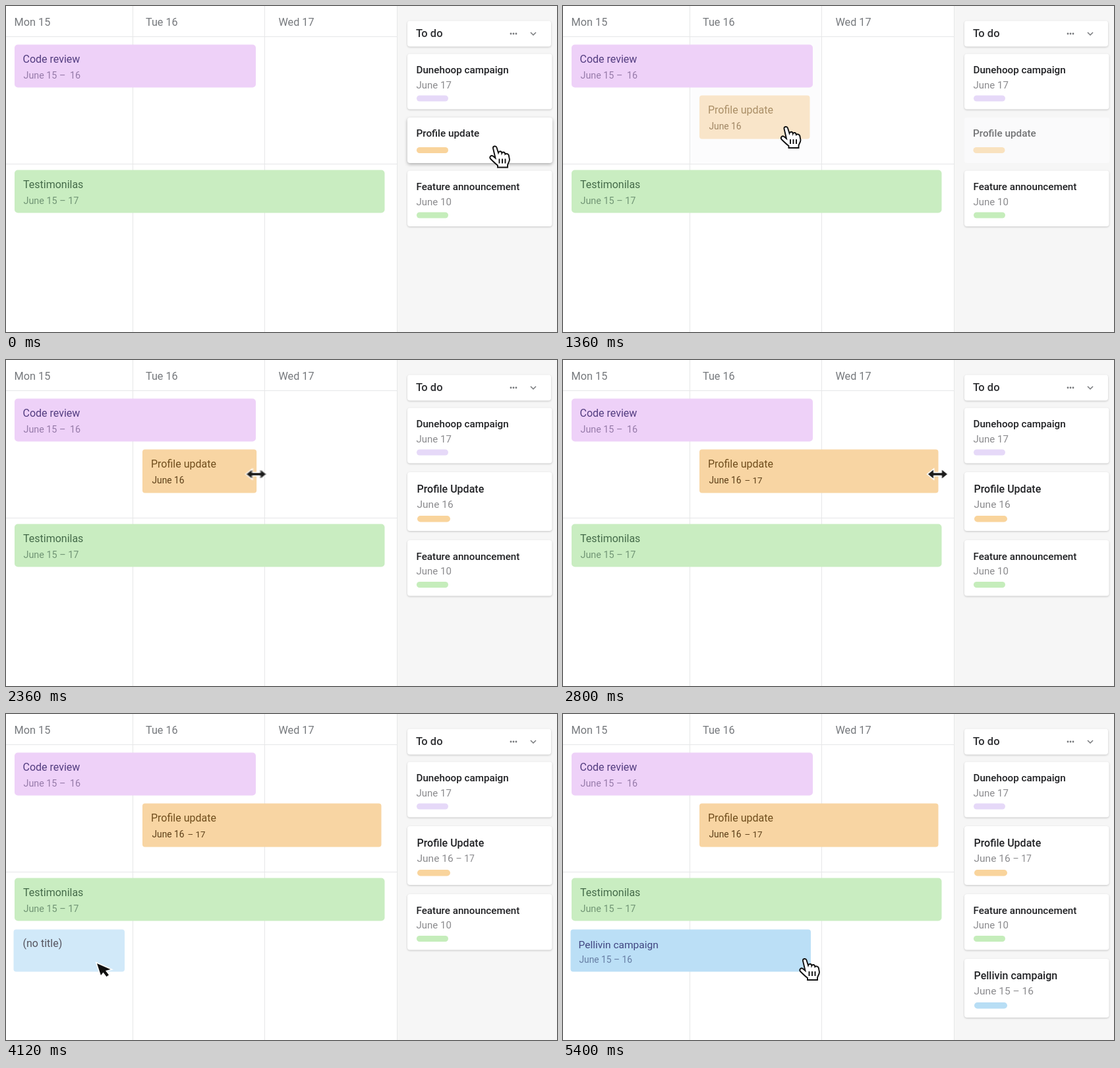
Write an HTML page with a canvas that moves like this. It is 836 by 494 pixels and loops after 6.52 s.

```html
<!DOCTYPE html>
<html lang="en">
<head>
<meta charset="utf-8">
<title>Calendar planning</title>
<style>
  html, body { margin: 0; width: 100%; height: 100%; overflow: hidden; background: #fff; }
  canvas { display: block; width: 836px; height: 494px; }
</style>
</head>
<body>
<canvas id="stage" width="836" height="494"></canvas>
<script>
const W = 836, H = 494, LOOP = 6520, STEP = 40;
const stage = document.getElementById('stage').getContext('2d');
const blurLayer = document.createElement('canvas');
blurLayer.width = W;
blurLayer.height = H;
const blurCtx = blurLayer.getContext('2d');

const PURPLE = '#eed1f8', GREEN = '#c9edc1', ORANGE = '#f8d5a3', BLUE = '#bbdff6';
const INK = '#202124', GRAY = '#8b8b8e';

const mix = (a, b, p) => a + (b - a) * p;
const span = (t, from, to) => Math.min(1, Math.max(0, (t - from) / (to - from)));
const smooth = u => u * u * (3 - 2 * u);
const lateSmooth = u => smooth(u * u);

function box(x, y, w, h, r, color) {
  stage.fillStyle = color;
  stage.beginPath();
  stage.roundRect(x, y, w, h, r);
  stage.fill();
}

function text(str, x, y, size, color, weight = 400) {
  stage.font = `${weight} ${size}px Roboto, sans-serif`;
  stage.fillStyle = color;
  stage.fillText(str, x, y);
}

function line(x1, y1, x2, y2) {
  stage.strokeStyle = '#e6e7e8';
  stage.lineWidth = 1;
  stage.beginPath();
  stage.moveTo(x1, y1);
  stage.lineTo(x2, y2);
  stage.stroke();
}

function faded(alpha, draw) {
  if (alpha <= 0) return;
  stage.save();
  stage.globalAlpha = alpha;
  draw();
  stage.restore();
}

function panel(x, y, w, h, lifted = false) {
  stage.save();
  stage.shadowColor = lifted ? 'rgba(0,0,0,.3)' : 'rgba(0,0,0,.2)';
  stage.shadowBlur = lifted ? 5 : 3;
  stage.shadowOffsetY = lifted ? 2 : 1;
  box(x, y, w, h, 4, '#fff');
  stage.restore();
}

function grid(t) {
  stage.fillStyle = '#fff';
  stage.fillRect(0, 0, W, H);
  if (t >= 1040 && t < 1440) {
    stage.fillStyle = '#fcfcfd';
    stage.fillRect(193, 47, 199, 191);
  }
  stage.fillStyle = '#f6f6f6';
  stage.fillRect(594, 0, W - 594, H);
  line(0, 46.5, 594, 46.5);
  line(0, 239.5, 594, 239.5);
  for (const x of [192.5, 392.5, 593.5]) line(x, 0, x, H);
  text('Mon 15', 12.5, 29.5, 16.3, '#76797d');
  text('Tue 16', 212, 29.5, 16.2, '#76797d');
  text('Wed 17', 413.5, 29.5, 16.2, '#76797d');
}

function fixedEvents() {
  box(13, 58.5, 366, 65, 5, PURPLE);
  text('Code review', 25.5, 86, 16, '#533d80');
  text('June 15 –', 26.5, 110, 14.3, '#967ba9');
  text('16', 97, 110, 14.3, '#967ba9');
  box(13, 248.5, 561.5, 65, 5, GREEN);
  text('Testimonilas', 26, 276, 16, '#456b4a');
  text('June 15 – 17', 26.5, 300, 14.4, '#719575');
}

function profileEvent(t) {
  faded(span(t, 1200, 1480), () => {
    const right = mix(374.5, 569.5, smooth(span(t, 2310, 2800)));
    box(207, 135.5, right - 207, 66, 4, ORANGE);
    text('Profile update', 220, 162.5, 16, '#704e1d');
    text('June 16', 221.5, 186.5, 13.8, '#5d3f18');
    if (t >= 2600) text('– 17', 275.5, 186.5, 13.3, '#5d3f18');
  });
}

function newEvent(t) {
  faded(span(t, 4040, 4160), () => {
    const right = mix(180, 376, smooth(span(t, 4400, 4960)));
    box(11.5, 326.5, right - 11.5, 64, 4, BLUE);
    const named = span(t, 5200, 5400);
    faded(1 - named, () => text('(no title)', 25.5, 352.5, 16, '#56545f'));
    faded(named, () => {
      text('Pellivin campaign', 23.5, 354.5, 15.5, '#404580');
      text('June 15 – 16', 24.5, 377, 13.8, '#667da3');
    });
  });
}

function profileCard(x, y, lifted) {
  panel(x, y, 220, 69, lifted);
  profileLabel(x, y, INK);
}

function profileLabel(x, y, color) {
  text('Profile update', x + 13.5, y + 29, 15.3, color, 500);
  box(x + 14, y + 45, 48, 9, 4.5, '#f9d49c');
}

function todoCard(y, h, title, date, pill, size = 15.2) {
  panel(609, y, 219.5, h);
  text(title, 622.5, y + 29.5, size, INK, 500);
  text(date, 622.5, y + 52, 15, GRAY);
  box(623, y + 63, 48, 9, 4.5, pill);
}

function wideCard(y, title, date, pill) {
  panel(609, y, 219.5, 89);
  text(title, 623.5, y + 30.5, 16, INK, 500);
  text(date, 623.5, y + 54, 15.5, GRAY);
  box(624, y + 66, 50, 9.5, 4.7, pill);
}

function sidebar(t) {
  panel(609, 22.5, 218, 39);
  text('To do', 622, 46.5, 16.5, '#303134', 500);
  stage.fillStyle = '#77797c';
  for (const x of [766, 770, 774]) {
    stage.beginPath();
    stage.arc(x, 42, 1.4, 0, 7);
    stage.fill();
  }
  stage.strokeStyle = '#77797c';
  stage.lineWidth = 1.5;
  stage.beginPath();
  stage.moveTo(796, 40);
  stage.lineTo(800, 44);
  stage.lineTo(804, 40);
  stage.stroke();

  todoCard(72.5, 84, 'Dunehoop campaign', 'June 17', '#e6d9f8');
  const scheduled = t >= 1400;
  todoCard(scheduled ? 273 : 249.5, 84.5, 'Feature announcement', 'June 10', '#c5edbb');
  if (scheduled) {
    wideCard(170, 'Profile Update', 'June 16', '#f9d49c');
    faded(span(t, 3080, 3200), () => text('– 17', 682.5, 224, 14, GRAY));
  } else if (t < 480) {
    profileCard(609, 169, true);
  } else {
    box(609, 169, 220, 69, 4, '#fafafb');
    faded(span(t, 1160, 1480), () => profileLabel(608.5, 169, INK));
  }
  faded(span(t, 5200, 5400), () => wideCard(371, 'Pellivin campaign', 'June 15 – 16', '#b8def5'));
}

function draggedCard(t) {
  if (t < 480 || t >= 1280) return;
  const p = lateSmooth(span(t, 460, 1120));
  faded(1 - span(t, 1160, 1280), () => profileCard(mix(609, 205, p), mix(169, 139, p), false));
}

const handShape = new Path2D('M6 4C5.5 .5 10.5 0 11.5 3L14 11C15 8 19 8 19.3 11.5C20.5 9 24 9.5 24.3 13C26 11.5 30 12.5 30 16L31 21C31 25 28 27 28 30V33H13V30C9 27 6 24 2 20C0 17 3 14 6 16L9.5 19Z');
const handLines = new Path2D('M15.5 20V27M20 20V27M24.5 20V27');
const arrowShape = new Path2D('M0 0L6 18L9.5 13.5L14.5 20L18 17.5L13 11L20.5 9Z');
const resizeShape = new Path2D('M-14.5 0L-6.5-6.5V-1.8H6.5V-6.5L14.5 0L6.5 6.5V1.8H-6.5V6.5Z');

function blackCursor(ctx, shape) {
  ctx.strokeStyle = '#fff';
  ctx.lineWidth = 3;
  ctx.stroke(shape);
  ctx.fillStyle = '#111';
  ctx.fill(shape);
}

const cursors = {
  hand(ctx) {
    ctx.translate(-16, -17.5);
    ctx.fillStyle = '#fff';
    ctx.fill(handShape);
    ctx.strokeStyle = '#111';
    ctx.lineWidth = 1.9;
    ctx.stroke(handShape);
    ctx.stroke(handLines);
  },
  arrow: ctx => blackCursor(ctx, arrowShape),
  resize: ctx => blackCursor(ctx, resizeShape)
};

function cursorKind(t) {
  if (t >= 2120 && t < 3200) return 'resize';
  if (t >= 3800 && t < 5240) return 'arrow';
  return 'hand';
}

function cursorPos(t) {
  const move = (x1, y1, x2, y2, p) => [mix(x1, x2, p), mix(y1, y2, p)];
  if (t < 1800) return move(749, 229, 345.5, 199.5, lateSmooth(span(t, 460, 1120)));
  if (t < 2280) return move(345.5, 199.5, 374, 173, smooth(span(t, 1780, 2200)));
  if (t < 3080) return move(374, 173, 568.5, 173, smooth(span(t, 2310, 2800)));
  if (t < 3800) return move(568.5, 173, 152, 387, lateSmooth(span(t, 3100, 3760)));
  if (t < 5240) return move(138, 378, 366, 378, smooth(span(t, 4400, 4960)));
  return [374, 387.5];
}

// Averages several positions around the moment to smear a fast cursor.
function cursor(t) {
  const kind = cursorKind(t);
  const samples = 12, shutter = 16;
  const still = t < 480 || (t >= 1120 && t < 1800) || (t >= 2840 && t < 3120) ||
    (t >= 3760 && t < 4400) || t >= 4960;
  if (still) {
    stage.save();
    stage.translate(...cursorPos(t));
    cursors[kind](stage);
    stage.restore();
    return;
  }
  blurCtx.clearRect(0, 0, W, H);
  // Each sample is flattened on its own before it joins the average.
  blurCtx.globalCompositeOperation = 'lighter';
  blurCtx.globalAlpha = 1 / samples;
  const sprite = sprites[kind];
  for (let i = 0; i < samples; i++) {
    const [x, y] = cursorPos(t + ((i + .5) / samples - .5) * shutter);
    blurCtx.drawImage(sprite, x - 32, y - 32);
  }
  stage.drawImage(blurLayer, 0, 0);
}

const sprites = {};
for (const kind in cursors) {
  const sprite = document.createElement('canvas');
  sprite.width = sprite.height = 64;
  const ctx = sprite.getContext('2d');
  ctx.translate(32, 32);
  cursors[kind](ctx);
  sprites[kind] = sprite;
}

function render(now) {
  const t = Math.floor((now % LOOP) / STEP) * STEP;
  grid(t);
  fixedEvents();
  profileEvent(t);
  newEvent(t);
  sidebar(t);
  draggedCard(t);
  cursor(t);
}

let start;
function frame(now) {
  start ??= now;
  render(now - start);
  requestAnimationFrame(frame);
}
requestAnimationFrame(frame);
</script>
</body>
</html>
```
